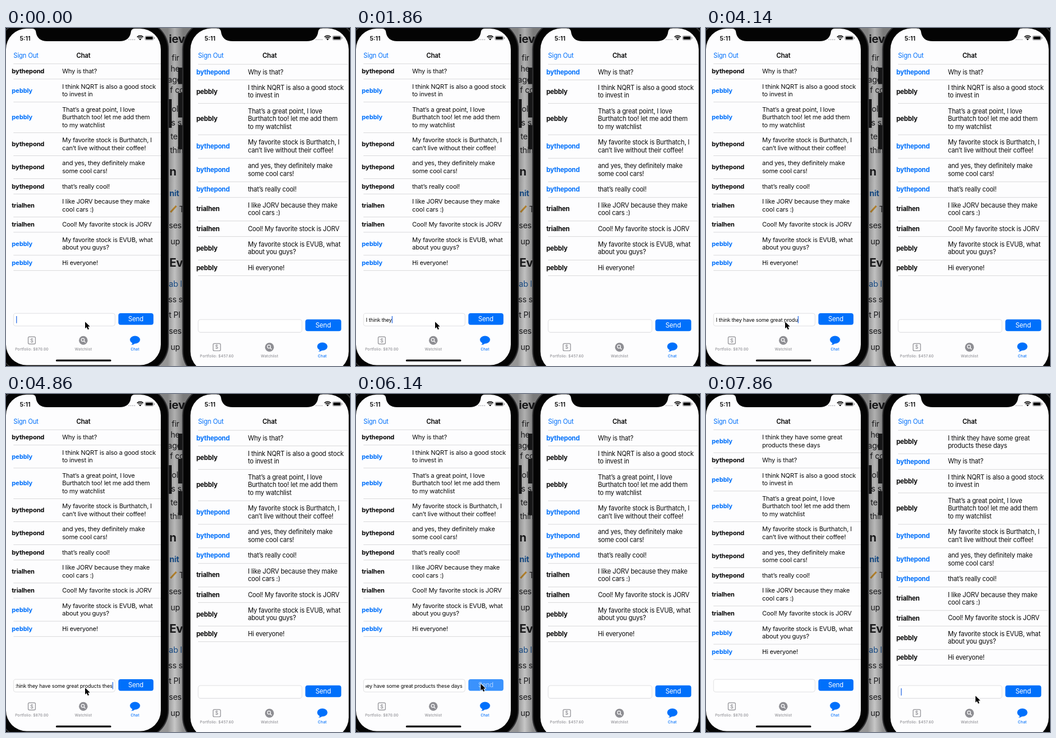
These frames come from a looping animation (600 px wide and 589 px high, 8000 ms). An HTML page with a canvas:

```html
<!DOCTYPE html>
<html lang="en">
<head>
<meta charset="utf-8">
<title>Chat demo</title>
<style>
html, body { margin: 0; width: 100%; height: 100%; overflow: hidden; background: #000; }
canvas { display: block; width: 600px; height: 589px; }
</style>
</head>
<body>
<canvas id="stage"></canvas>
<script>
const W = 600, H = 589, LOOP = 8000;
const canvas = document.getElementById('stage');
const ctx = canvas.getContext('2d');
const dpr = window.devicePixelRatio || 1;
canvas.width = W * dpr;
canvas.height = H * dpr;

const FONT = 'Inter, "Liberation Sans", sans-serif';
const BLUE = '#0070fb', GRAY = '#8e8e93', INK = '#080808', PAPER = '#fdfdfe';
const SEND_STEP = 44, FOCUS_STEP = 55;
const DRAFT = 'I think they have some great products these days';
const ME = 'pebbly', PAL = 'bythepond', THIRD = 'trialhen';

const messages = [
  [PAL, 'Why is that?'],
  [ME, 'I think NQRT is also a good stock', 'to invest in'],
  [ME, 'That’s a great point, I love', 'Burthatch too! let me add them', 'to my watchlist'],
  [PAL, 'My favorite stock is Burthatch, I', 'can’t live without their coffee!'],
  [PAL, 'and yes, they definitely make', 'some cool cars!'],
  [PAL, 'that’s really cool!'],
  [THIRD, 'I like JORV because they make', 'cool cars :)'],
  [THIRD, 'Cool! My favorite stock is JORV'],
  [ME, 'My favorite stock is EVUB, what', 'about you guys?'],
  [ME, 'Hi everyone!']
];
const sent = [ME, 'I think they have some great', 'products these days'];

const phones = [
  { x: 0, y: 0, scale: 1, user: ME, cash: '$870.00' },
  { x: 321.7, y: -0.5, scale: 1.0225, user: PAL, cash: '$457.60' }
];

// [step, value...] keys
const typingKeys = [[3, 0], [13, 12], [22, 23], [34, 42], [38, 48]];
const mouseKeys = [[38, 138, 512], [42, 217.5, 505], [47, 217.5, 505], [53, 470, 526]];

function keyed(keys, k, ease = u => u) {
  if (k <= keys[0][0]) return keys[0].slice(1);
  for (let i = 1; i < keys.length; i++) {
    const a = keys[i - 1], b = keys[i];
    if (k <= b[0]) {
      const u = ease((k - a[0]) / (b[0] - a[0]));
      return a.slice(1).map((v, j) => v + (b[j + 1] - v) * u);
    }
  }
  return keys[keys.length - 1].slice(1);
}
const smooth = u => u * u * (3 - 2 * u);

function stepAt(t) {
  const k = Math.round(t * 0.007);
  return Math.round(k * 100 / 7) * 10 > t ? k - 1 : k;
}

function setFont(size, weight = 400, track = -0.016) {
  ctx.font = `${weight} ${size}px ${FONT}`;
  ctx.letterSpacing = (size * track).toFixed(3) + 'px';
}

// y is the middle of the capital letters
function label(str, x, y, size, color, { weight, track, align = 'left' } = {}) {
  setFont(size, weight, track);
  ctx.textAlign = align;
  ctx.fillStyle = color;
  ctx.fillText(str, x, y + size * 0.36);
}

function box(x, y, w, h, r, fill, stroke, line = 1) {
  ctx.beginPath();
  ctx.roundRect(x, y, w, h, r);
  if (fill) { ctx.fillStyle = fill; ctx.fill(); }
  if (stroke) { ctx.strokeStyle = stroke; ctx.lineWidth = line; ctx.stroke(); }
}

function disc(x, y, r, fill) {
  ctx.beginPath();
  ctx.arc(x, y, r, 0, Math.PI * 2);
  ctx.fillStyle = fill;
  ctx.fill();
}

function segment(x1, y1, x2, y2, color, width) {
  ctx.beginPath();
  ctx.moveTo(x1, y1);
  ctx.lineTo(x2, y2);
  ctx.strokeStyle = color;
  ctx.lineWidth = width;
  ctx.stroke();
}

function polygon(points, fill) {
  ctx.beginPath();
  points.forEach(([x, y]) => ctx.lineTo(x, y));
  ctx.closePath();
  ctx.fillStyle = fill;
  ctx.fill();
}

function drawPage() {
  const light = ctx.createLinearGradient(0, 0, 0, H);
  light.addColorStop(0, '#b4b4b4');
  light.addColorStop(1, '#cecece');
  ctx.fillStyle = light;
  ctx.fillRect(250, 0, 90, H);

  const ink = '#1c1c1e', link = '#17508f';
  [['iev', 284, 19], ['n', 285, 250], ['Ev', 285, 409]].forEach(([s, x, y]) =>
    label(s, x, y, 20, ink, { weight: 700 }));
  [['fir', 289, 52], ['he', 287, 71], ['age', 282, 90], ['f co', 286, 108],
   ['ol', 289, 141], ['s s', 288, 165], ['te', 287, 189], ['thin', 286, 213],
   ['T', 302, 316], ['ses', 284, 344], ['up', 287, 372], ['ss s', 283, 473],
   ['t Pl', 284, 500], ['ses', 284, 528], ['up', 287, 556]].forEach(([s, x, y]) =>
    label(s, x, y, 14, ink));
  label('nit', 285, 288, 14, link, { weight: 700 });
  label('ab l', 284, 446, 14, link);

  polygon([[286, 310], [296, 310], [296, 323], [286, 323]], '#c4c4c1');
  segment(287, 321, 297, 310, '#b9852c', 3);

  const shade = ctx.createLinearGradient(282, 0, 309, 0);
  shade.addColorStop(0, 'rgba(0,0,0,.28)');
  shade.addColorStop(0.45, 'rgba(0,0,0,.03)');
  shade.addColorStop(1, 'rgba(0,0,0,.32)');
  ctx.fillStyle = shade;
  ctx.fillRect(250, 0, 90, H);
}

function drawBody(side) {
  ctx.fillStyle = '#161617';
  if (side === 0) {
    ctx.fillRect(282, 124, 7, 50);
  } else {
    [[68, 28], [111, 42], [166, 41]].forEach(([y, h]) => ctx.fillRect(-21, y, 8, h));
  }
  box(-14, -13, 298, 614, 50, '#303032');
  box(-12, -11, 294, 610, 48, '#040404');
  box(0, 1, 270, 586.5, 36, PAPER);

  ctx.beginPath();
  ctx.moveTo(45, -3);
  ctx.lineTo(45, 1);
  ctx.quadraticCurveTo(51, 1, 52, 6);
  ctx.quadraticCurveTo(54, 23, 72, 23);
  ctx.lineTo(198, 23);
  ctx.quadraticCurveTo(216, 23, 218, 6);
  ctx.quadraticCurveTo(219, 1, 225, 1);
  ctx.lineTo(225, -3);
  ctx.closePath();
  ctx.fillStyle = '#040404';
  ctx.fill();
}

function drawStatus() {
  label('5:11', 24, 17.8, 10.5, INK, { weight: 600, track: 0 });
  for (let i = 0; i < 4; i++) disc(214.4 + i * 3.3, 20.2, 1, '#b5b5b8');
  ctx.strokeStyle = INK;
  ctx.lineWidth = 1.6;
  [7.6, 4.9].forEach(r => {
    ctx.beginPath();
    ctx.arc(234, 21.2, r, -Math.PI * 0.75, -Math.PI * 0.25);
    ctx.stroke();
  });
  polygon([[234, 21.6], [231.8, 19], [234, 18.2], [236.2, 19]], INK);
  box(242.4, 13.8, 14.8, 7.4, 2.2, null, '#8a8a8d', 0.8);
  box(243.6, 15, 12.4, 5, 1.2, INK);
  box(258, 16, 1.1, 3, 0.6, '#8a8a8d');
}

function drawRows(user, rows) {
  const rule = y => {
    ctx.fillStyle = '#dadadc';
    ctx.fillRect(13, y - 0.2, 257, 1);
  };
  let y = 62;
  rule(y);
  rows.forEach(([name, ...lines]) => {
    const h = 13.2 + 13.43 * lines.length;
    const mid = y + h / 2;
    label(name, 10, mid, 11, name === user ? BLUE : INK, { weight: 700 });
    lines.forEach((s, i) =>
      label(s, 98, mid + (i - (lines.length - 1) / 2) * 13.43, 10.85, INK));
    y += h;
    rule(y);
  });
}

function drawInput(text, caret, pressed) {
  box(13.2, 497.2, 177, 22, 4, '#fff', '#e0e0e2', 1);
  ctx.save();
  ctx.beginPath();
  ctx.rect(17, 498, 170, 20);
  ctx.clip();
  setFont(9);
  const width = ctx.measureText(text).width;
  const x = Math.min(17.6, 185.6 - width);
  label(text, x, 508.4, 9, INK);
  if (caret) {
    ctx.fillStyle = '#2f6fe4';
    ctx.fillRect(x + width + (text ? 0 : 0.2), 502, 1.3, 12.4);
  }
  ctx.restore();
  box(196, 497.1, 61.2, 20.1, 4, pressed ? '#3a92fd' : BLUE);
  label('Send', 226.4, 507.2, 11.2, pressed ? '#a9d0ff' : '#fff', { align: 'center' });
}

function drawTabs(cash) {
  const tab = { weight: 500, track: 0.028, align: 'center' };
  box(38.7, 538.2, 12.6, 12.4, 2, null, GRAY, 1.2);
  label('$', 45, 544.5, 8.6, GRAY, { weight: 500, track: 0, align: 'center' });
  label('Portfolio: ' + cash, 45, 559.3, 6.4, GRAY, tab);

  disc(134.8, 544.4, 7.6, GRAY);
  ctx.beginPath();
  ctx.arc(134, 543.5, 2.7, 0, Math.PI * 2);
  ctx.strokeStyle = PAPER;
  ctx.lineWidth = 1.2;
  ctx.stroke();
  segment(136, 545.5, 138.6, 548.1, PAPER, 1.3);
  label('Watchlist', 135, 559.3, 6.4, GRAY, tab);

  ctx.beginPath();
  ctx.ellipse(225, 543.3, 8.8, 6.8, 0, 0, Math.PI * 2);
  ctx.fillStyle = BLUE;
  ctx.fill();
  polygon([[219.5, 547], [220.4, 550.2], [218.3, 552.2], [222.5, 551.4], [226, 549]], BLUE);
  label('Chat', 225, 559.3, 6.4, BLUE, tab);

  box(87, 577.8, 96.5, 3.2, 1.6, '#000');
}

function drawPhone(phone, side, state) {
  ctx.save();
  ctx.translate(phone.x, phone.y);
  ctx.scale(phone.scale, phone.scale);
  drawBody(side);
  drawStatus();
  label('Sign Out', 13, 47.8, 11.1, BLUE);
  label('Chat', 135, 47.8, 11.1, INK, { weight: 600, align: 'center' });
  drawRows(phone.user, state.rows);
  drawInput(state.text, state.caret, state.pressed);
  drawTabs(phone.cash);
  ctx.restore();
}

function drawMouse([x, y]) {
  ctx.save();
  ctx.translate(x, y);
  ctx.beginPath();
  [[0, 0], [0, 11.6], [2.7, 9.2], [4.7, 13.6], [6.8, 12.7], [4.9, 8.4], [8.5, 8.3]]
    .forEach(([px, py]) => ctx.lineTo(px, py));
  ctx.closePath();
  ctx.lineJoin = 'round';
  ctx.strokeStyle = '#fff';
  ctx.lineWidth = 1.8;
  ctx.stroke();
  ctx.fillStyle = '#000';
  ctx.fill();
  ctx.restore();
}

function caretOn(k) {
  if (k < 42) return true;
  if (k < SEND_STEP || k >= FOCUS_STEP) return false;
  return (k - SEND_STEP) % 7 < 4;
}

function draw(t) {
  const k = stepAt(t);
  const done = k >= SEND_STEP;
  const rows = done ? [sent, ...messages] : messages;
  const count = Math.round(keyed(typingKeys, k)[0]);

  ctx.setTransform(dpr, 0, 0, dpr, 0, 0);
  ctx.clearRect(0, 0, W, H);
  drawPage();
  drawPhone(phones[0], 0, {
    rows, text: done ? '' : DRAFT.slice(0, count),
    caret: caretOn(k), pressed: k === SEND_STEP - 1
  });
  drawPhone(phones[1], 1, { rows, text: '', caret: k >= FOCUS_STEP, pressed: false });
  drawMouse(keyed(mouseKeys, k, smooth));
}

const start = performance.now();
function tick() {
  draw((performance.now() - start) % LOOP);
  requestAnimationFrame(tick);
}
tick();
</script>
</body>
</html>
```
